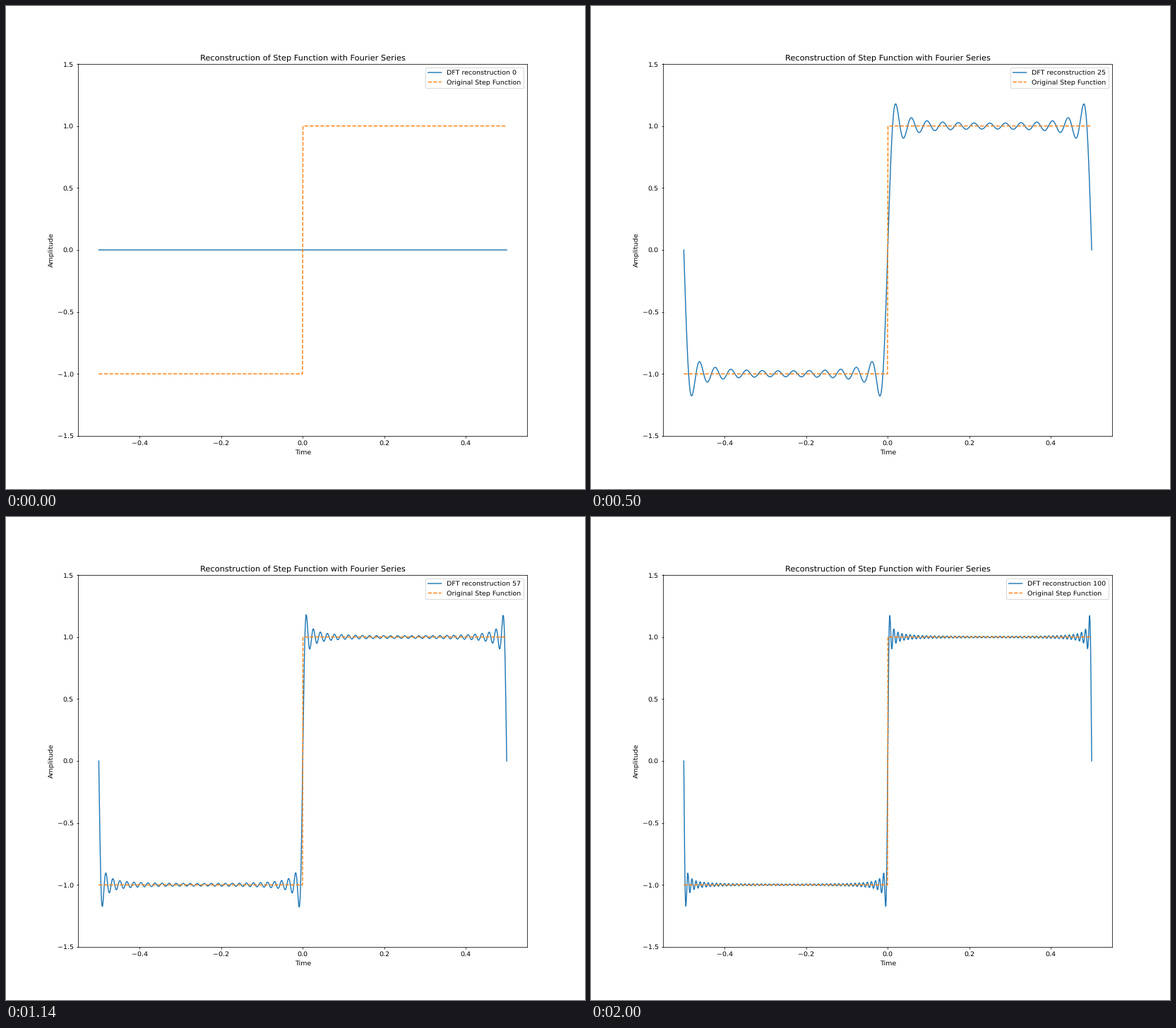
Animation, 820 px wide and 683 px high, one loop 2020 ms. Source, as a matplotlib script:

```python
import numpy as np
import matplotlib.pyplot as plt
from matplotlib.animation import FuncAnimation

FRAMES = 101
INTERVAL = 20
DPI = 820 / 12

plt.rcParams["font.family"] = "DejaVu Sans"
plt.rcParams["text.hinting"] = "none"

t = np.linspace(-0.5, 0.5, 1000)
step = np.where(t < 0, -1.0, 1.0)


def reconstruct(order):
    """Sum of the sampled step's sine harmonics up to the given order."""
    n = np.arange(1, order + 1)[:, None]
    waves = np.sin(2 * np.pi * n * t)
    weights = 2 * (step * waves).mean(axis=1)
    return weights @ waves


# The height carries a hair of slack so it truncates to 683 px.
fig, ax = plt.subplots(figsize=(12, 683.005 / DPI), dpi=DPI)
series, = ax.plot(t, np.zeros_like(t), label="DFT reconstruction 0")
ax.plot(t, step, "--", label="Original Step Function")
ax.set_xlim(-0.55, 0.55)
ax.set_ylim(-1.5, 1.5)
ax.set_xlabel("Time")
ax.set_ylabel("Amplitude")
ax.set_title("Reconstruction of Step Function with Fourier Series")
legend = ax.legend(loc="upper right")
caption = legend.get_texts()[0]

# Keep these strokes at their true sub-pixel place.
for artist in [*ax.lines, *legend.get_lines(), ax.spines["left"]]:
    artist.set_snap(False)


def update(order):
    series.set_ydata(reconstruct(order))
    caption.set_text(f"DFT reconstruction {order}")
    return series, caption


anim = FuncAnimation(fig, update, frames=FRAMES, interval=INTERVAL,
                     repeat=True, repeat_delay=0, blit=False)
plt.show()
```
